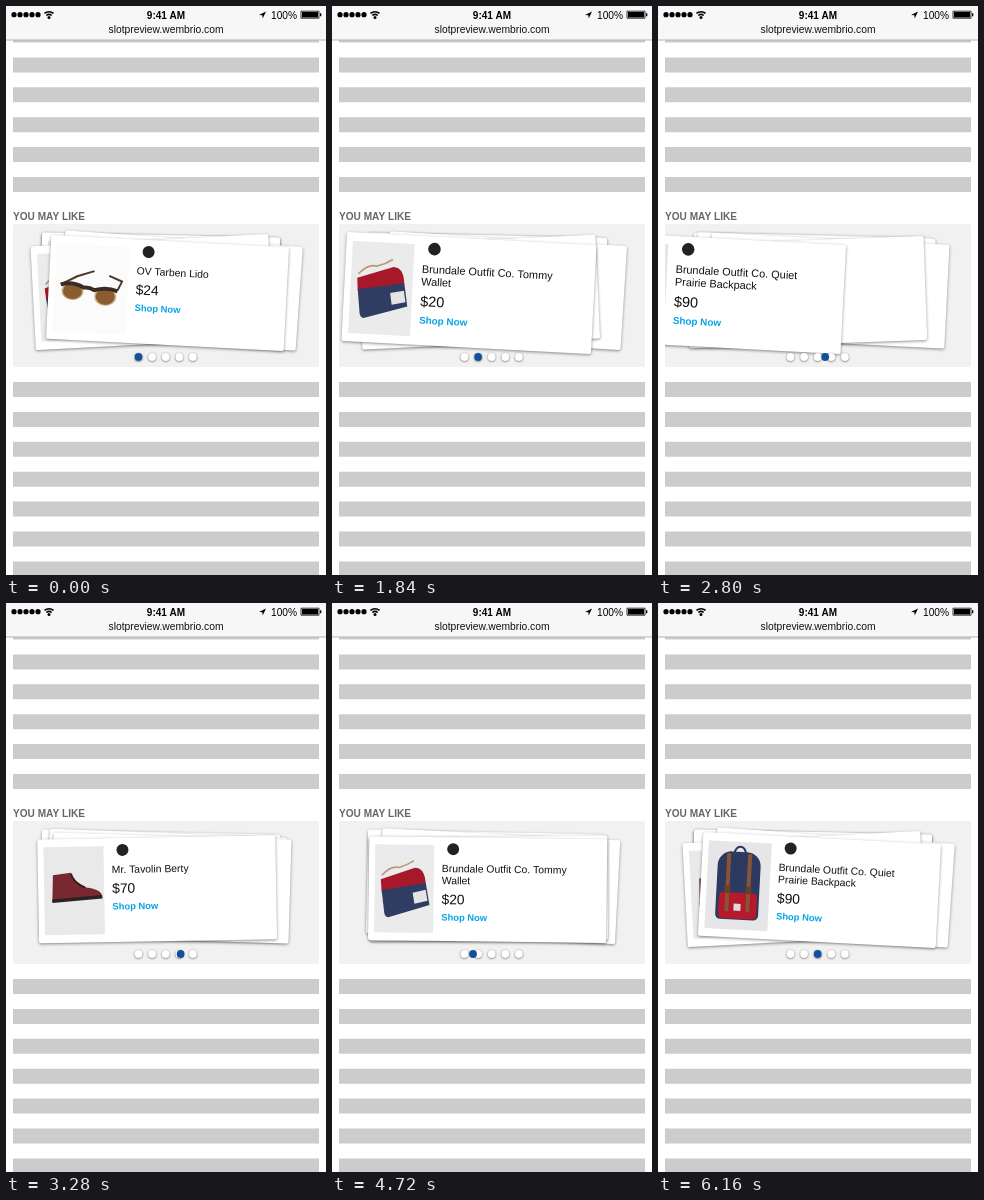
Recreate the animation shown at these times as an HTML page with a canvas. Size 320 by 569 pixels, loop 6.64 s.

```html
<!DOCTYPE html>
<html lang="en">
<head>
<meta charset="utf-8">
<title>Card carousel</title>
<style>
html, body { margin: 0; width: 100%; height: 100%; overflow: hidden; background: #fff; }
canvas { display: block; width: 320px; height: 569px; }
</style>
</head>
<body>
<canvas width="320" height="569"></canvas>
<script>
const canvas = document.querySelector('canvas');
const c = canvas.getContext('2d');
const LOOP = 6640;
const CARD_W = 238, CARD_H = 104;

// Stack poses from front to back: centre x, centre y, degrees.
const POSES = [[161.5, 287, 3], [146, 286, -3], [174.5, 284.5, 4], [154, 281, 1.2], [154, 281, 1.2]];

// Time to number of cards swiped away.
const SWIPE = [[1120, 0], [1200, .06], [1440, .6], [1680, 1], [1790, 1], [1840, 1.05], [2080, 1.6],
  [2320, 2], [2430, 2], [2480, 2.04], [3280, 2.33], [3520, 3], [3760, 3], [3840, 3.08], [4080, 3.7],
  [4200, 4], [4440, 4.9], [4500, 5], [4720, 5.62], [4880, 6], [4960, 6], [5400, 6.45], [6080, 7]];
// Time to position of the active dot.
const DOT = [[1280, 0], [1520, 1], [1920, 1], [2160, 2], [2640, 2], [2960, 3.1], [3280, 3.1], [3400, 3],
  [3700, 3], [3840, 4.07], [3960, 4], [4160, 4], [4320, 0], [4640, 0], [4720, .62], [4800, 1],
  [5040, 1], [5240, 2]];

const mix = (a, b, q) => a + (b - a) * q;

function track(keys, t) {
  const i = keys.findIndex(k => k[0] > t);
  if (i < 0) return keys[keys.length - 1][1];
  if (i === 0) return keys[0][1];
  const [t0, a] = keys[i - 1], [t1, b] = keys[i];
  return mix(a, b, (t - t0) / (t1 - t0));
}

function rect(x, y, w, h, color, r = 0) {
  c.fillStyle = color;
  c.beginPath();
  c.roundRect(x, y, w, h, r);
  c.fill();
}

function oval(x, y, rx, ry, color) {
  c.fillStyle = color;
  c.beginPath();
  c.ellipse(x, y, rx, ry, 0, 0, 7);
  c.fill();
}

function shape(path, color) {
  c.fillStyle = color;
  c.fill(new Path2D(path));
}

function line(path, color, width) {
  c.strokeStyle = color;
  c.lineWidth = width;
  c.stroke(new Path2D(path));
}

function text(str, x, y, size, color = '#111', weight = '', align = 'left') {
  c.font = `${weight} ${size}px "Liberation Sans", Arial, sans-serif`;
  c.textAlign = align;
  c.fillStyle = color;
  c.fillText(str, x, y);
}

function glasses() {
  line('M12 49 L28 40 L45 34 M69 52 L73 43 L60 38', '#4a382c', 2);
  for (const [x, y] of [[24, 55], [57, 59]]) {
    oval(x, y, 11, 9, '#c9ad78');
    oval(x, y, 9.5, 8, '#8b5c30');
  }
  line('M12 49 Q24 45 35 51 Q40 50 46 53 Q58 49 69 53', '#3b2b24', 4);
}

function wallet() {
  line('M13 39 Q22 29 30 31 Q38 29 45 24', '#b79a7c', 1.6);
  shape('M12 43 L46 31 Q56 31 57 47 L13 55 Z', '#a8182b');
  shape('M13 54 L57 46 L61 68 L20 81 Q17 81 16 77 Z', '#2f3d63');
  shape('M44 56 L57 53 L59 64 L46 67 Z', '#e4e4e4');
}

function backpack() {
  line('M32 21 Q33 13 38 13 Q43 13 44 21', '#28365a', 2);
  rect(16, 18, 43, 68, '#2c3a60', [14, 14, 5, 5]);
  rect(19, 59, 38, 26, '#b51a2c', 4);
  for (const x of [25, 46]) {
    rect(x, 20, 4, 58, '#8a5336');
    rect(x - 1, 52, 6, 8, '#6c3f2a', 1);
  }
  rect(34, 70, 7, 7, '#e0dada');
}

function boot() {
  shape('M15 36 L33 34 Q35 43 48 49 Q64 51 64 59 L14 63 Z', '#78292f');
  line('M14 62 L64 58.5', '#2b2226', 3.5);
  line('M33 35 Q35 44 47 49', '#3d1a1e', 2);
}

function cap() {
  shape('M18 55 Q18 34 36 34 Q53 34 53 55 Z', '#6f5846');
  shape('M16 54 Q36 49 60 57 Q44 62 16 58 Z', '#4b3a2e');
}

const ITEMS = [
  { title: ['OV Tarben Lido'], price: '$24', width: 73, back: '#fbfbfb', draw: glasses },
  { title: ['Brundale Outfit Co. Tommy', 'Wallet'], price: '$20', width: 59, back: '#ebebeb', draw: wallet },
  { title: ['Brundale Outfit Co. Quiet', 'Prairie Backpack'], price: '$90', width: 63, back: '#e6e6e8', draw: backpack },
  { title: ['Mr. Tavolin Berty'], price: '$70', width: 60, back: '#e9e9e9', draw: boot },
  { title: ['Plain Wool Cap'], price: '$30', width: 60, back: '#ebebeb', draw: cap }
];

function card(item, [x, y, angle], scale) {
  c.save();
  c.translate(x, y);
  c.rotate(angle * Math.PI / 180);
  c.scale(scale, scale);
  c.translate(-CARD_W / 2, -CARD_H / 2);
  c.shadowColor = 'rgba(0,0,0,.45)';
  c.shadowBlur = 3;
  c.shadowOffsetY = 1;
  rect(0, 0, CARD_W, CARD_H, '#fff', 2);
  c.shadowColor = 'transparent';

  rect(6, 8, item.width, 88, item.back);
  item.draw();
  const left = item.width + 14;
  const extra = (item.title.length - 1) * 12;
  oval(left + 11, 12, 6, 6, '#222');
  item.title.forEach((row, i) => text(row, left, 35 + i * 12, 10.4));
  text(item.price, left, 55 + extra, 13.8);
  text('Shop Now', left, 71.5 + extra, 9.4, '#06a3e6', 'bold');
  c.restore();
}

function statusBar() {
  rect(0, 0, 320, 34, '#f7f7f7');
  rect(0, 33.5, 320, 1, '#b5b5b5');
  for (let i = 0; i < 5; i++) oval(8 + i * 6, 8.7, 2.6, 2.6, '#000');
  c.strokeStyle = '#000';
  c.lineWidth = 1.6;
  for (const r of [4, 6.8]) {
    c.beginPath();
    c.arc(43, 12.5, r, -2.3, -.84);
    c.stroke();
  }
  oval(43, 11.6, 1.5, 1.5, '#000');
  text('9:41 AM', 160, 12.5, 10, '#000', 'bold', 'center');
  shape('M253 9 L260 5.5 L256.7 12.6 L256.4 9.3 Z', '#000');
  text('100%', 265, 12.5, 10.2, '#000');
  line('M295 5.2 H313 V12.2 H295 Z', '#000', .8);
  rect(296, 6, 16, 5.5, '#000');
  rect(314, 7.2, 1.3, 3, '#000');
  text('slotpreview.wembrio.com', 160, 26.5, 10.3, '#111', '', 'center');
}

function page() {
  rect(0, 0, 320, 569, '#fff');
  for (let i = 0; i < 6; i++) rect(7, 21.5 + i * 29.9, 306, 15, '#ccc');
  for (let i = 0; i < 7; i++) rect(7, 376 + i * 29.9, 306, 15, '#ccc');
  statusBar();
  text('YOU MAY LIKE', 7, 214, 10.1, '#666', 'bold');
}

function stack(t) {
  const p = track(SWIPE, t), first = Math.floor(p), q = p - first;
  c.save();
  c.beginPath();
  c.roundRect(7, 218, 306, 143, 2);
  c.clip();
  rect(7, 218, 306, 143, '#f1f1f1');
  for (let k = 4; k >= 0; k--) {
    const item = ITEMS[(first + k) % 5];
    if (k) {
      card(item, POSES[k].map((v, i) => mix(v, POSES[k - 1][i], q)), 1);
    } else {
      const [x, y, angle] = POSES[0];
      card(item, [x - 380 * q - 1700 * q * q, y, angle], 1 + .05 * Math.min(1, q / .04));
    }
  }
  c.restore();
}

function dots(t) {
  const dot = (i, color) => oval(132.5 + i * 13.6, 351, 3.9, 3.9, color);
  c.save();
  c.shadowColor = 'rgba(0,0,0,.6)';
  c.shadowBlur = 2;
  c.shadowOffsetY = .5;
  for (let i = 0; i < 5; i++) dot(i, '#fff');
  c.restore();
  dot(track(DOT, t), '#12509c');
}

function frame(now) {
  const t = now % LOOP;
  page();
  stack(t);
  dots(t);
  requestAnimationFrame(frame);
}
requestAnimationFrame(frame);
</script>
</body>
</html>
```
